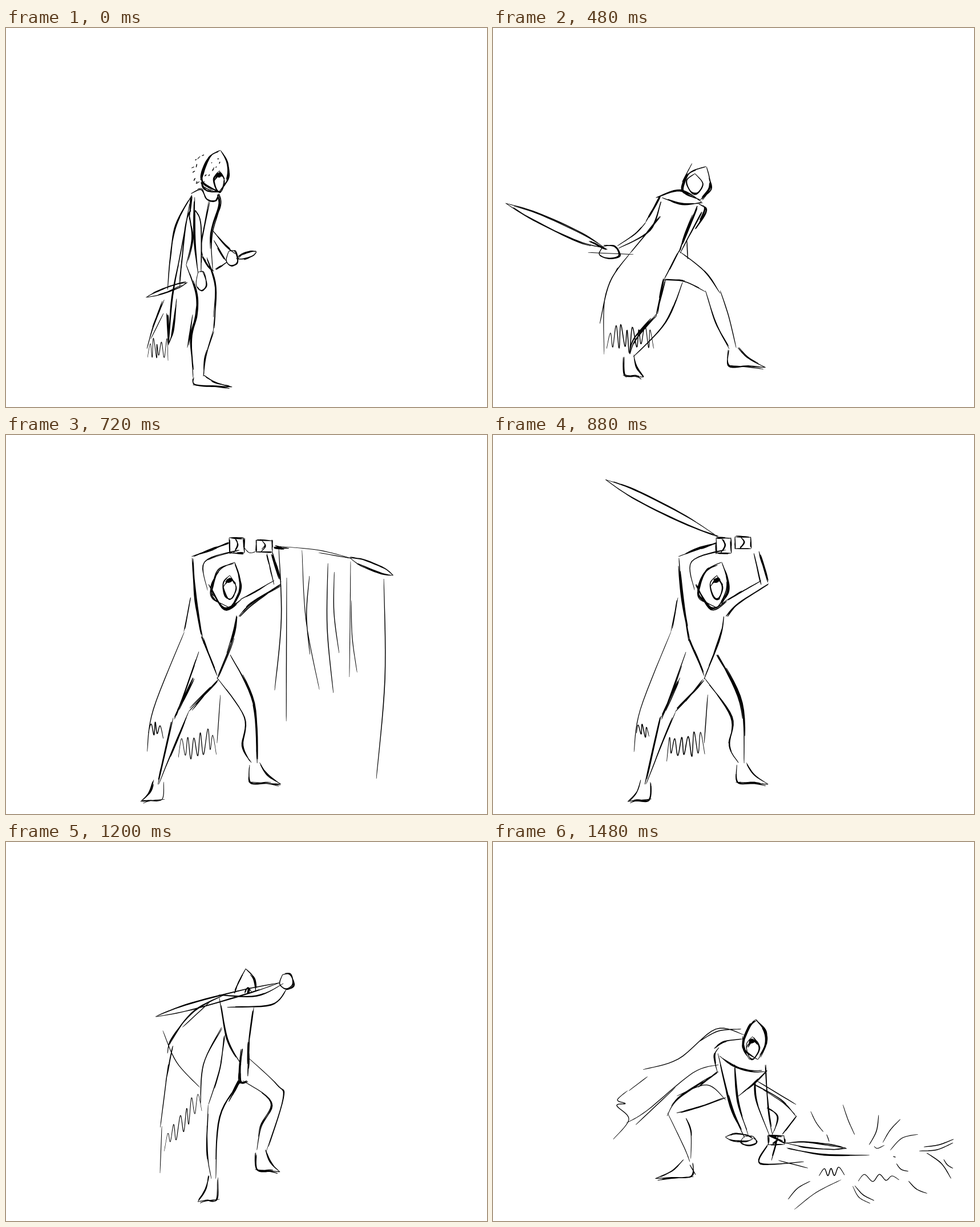
Recreate the animation shown at these times as an HTML page. Size 843 by 664 pixels, loop 1760 ms.

```html
<!DOCTYPE html>
<html lang="en">
<head>
<meta charset="utf-8">
<title>Sword swing</title>
<style>
html, body { margin: 0; width: 100%; height: 100%; overflow: hidden; background: #fff; }
svg { display: block; width: 100%; height: 100%; }
</style>
</head>
<body>
<svg viewBox="0 0 843 664"><path id="ink" fill="#000"/></svg>
<script>
let seed = 1, out = '';

function rnd() {
  seed = (seed * 16807) % 2147483647;
  return seed / 2147483647;
}
const jitter = amp => (rnd() * 2 - 1) * amp;
const mix = (a, b, t) => a + (b - a) * t;

// Catmull-Rom curve through the points, as a dense polyline.
function spline(pts) {
  const last = pts.length - 1, line = [];
  const at = i => pts[Math.max(0, Math.min(last, i))];
  for (let i = 0; i < last; i++) {
    for (let t = 0; t < 1; t += 0.125) {
      line.push([0, 1].map(k => {
        const a = at(i - 1)[k], b = at(i)[k], c = at(i + 1)[k], d = at(i + 2)[k];
        return b + t * (c - a + t * (2 * a - 5 * b + 4 * c - d + t * (3 * (b - c) + d - a))) / 2;
      }));
    }
  }
  line.push(at(last));
  return line;
}

// Outline of a pen line that thins out at both ends.
function taper(line, width) {
  const left = [], right = [], last = line.length - 1;
  line.forEach(([x, y], i) => {
    const a = line[Math.max(0, i - 1)], b = line[Math.min(last, i + 1)];
    const dx = b[0] - a[0], dy = b[1] - a[1], len = Math.hypot(dx, dy) || 1;
    const w = width / 2 * (0.4 + 0.6 * Math.sqrt(Math.abs(Math.sin(Math.PI * i / last))));
    const nx = -dy / len * w, ny = dx / len * w;
    left.push((x + nx).toFixed(1) + ' ' + (y + ny).toFixed(1));
    right.unshift((x - nx).toFixed(1) + ' ' + (y - ny).toFixed(1));
  });
  return 'M' + left.concat(right).join('L') + 'Z';
}

// A pen draws one full line, then goes over random stretches of it.
const pen = (passes, width, wobble) => (...xy) => {
  const pts = [];
  for (let i = 0; i < xy.length; i += 2) pts.push([xy[i], xy[i + 1]]);
  for (let p = 0; p < passes; p++) {
    const amp = p ? wobble : 0.4;
    let line = spline(pts.map(pt => pt.map(v => v + jitter(amp))));
    if (p) {
      const span = Math.ceil(line.length * mix(0.4, 0.8, rnd()));
      const from = Math.floor(rnd() * (line.length - span));
      line = line.slice(from, from + span);
    }
    out += taper(line, width * mix(0.75, 1.15, rnd()));
  }
};
const thin = pen(1, 1.4, 0);
const rough = pen(3, 1.6, 1.8);
const heavy = pen(5, 1.9, 2.4);
const blot = pen(2, 8, 1);

function arc(x1, y1, x2, y2, bow = 5) {
  const len = Math.hypot(x2 - x1, y2 - y1);
  thin(x1, y1, (x1 + x2) / 2 + (y2 - y1) / len * bow, (y1 + y2) / 2 - (x2 - x1) / len * bow, x2, y2);
}

function hood(x, y, rx, ry, lean) {
  const tip = [x + lean, y - ry], chin = [x + rx * 0.25, y + ry];
  heavy(...tip, x - rx * 0.45, y - ry * 0.65, x - rx * 0.9, y + ry * 0.1, x - rx * 0.8, y + ry * 0.6, ...chin);
  heavy(...tip, x + rx * 0.85, y - ry * 0.35, x + rx * 0.9, y + ry * 0.3, ...chin);
}

function face(x, y, rx, ry, dark) {
  rough(x, y - ry, x - rx, y - ry * 0.3, x - rx * 0.6, y + ry * 0.8, x + rx * 0.3, y + ry, x + rx, y, x, y - ry);
  if (dark) {
    blot(x - rx * 0.5, y - ry * 0.5, x + rx * 0.3, y - ry * 0.6);
    heavy(x - rx, y, x, y - ry * 0.7, x + rx, y - ry * 0.2);
  }
}

const fist = (x, y, rx, ry) =>
  rough(x - rx * 0.6, y - ry, x - rx, y + ry * 0.3, x, y + ry, x + rx, y + ry * 0.4, x + rx * 0.5, y - ry, x - rx * 0.6, y - ry);

function box(x, y, w, h) {
  rough(x, y, x + w, y + 1);
  rough(x + w, y, x + w + 1, y + h);
  rough(x + w, y + h, x, y + h);
  rough(x + 1, y + h, x, y);
  rough(x + w * 0.4, y + 2, x + w * 0.6, y + h * 0.5, x + w * 0.3, y + h);
}

function blade(x1, y1, x2, y2, w) {
  const len = Math.hypot(x2 - x1, y2 - y1);
  const nx = (y2 - y1) / len * w / 2, ny = (x1 - x2) / len * w / 2;
  for (const s of [-1, 1]) {
    rough(x1, y1, mix(x1, x2, 0.3) + nx * s, mix(y1, y2, 0.3) + ny * s,
      mix(x1, x2, 0.75) + nx * s, mix(y1, y2, 0.75) + ny * s, x2, y2);
  }
}

function foot(ax, ay, tx, ty) {
  const s = Math.sign(tx - ax);
  rough(ax - s * 8, ay, ax - s * 6, ty - 4, mix(ax, tx, 0.5), ty - 2, tx, ty);
  rough(ax + s * 9, ay - 4, mix(ax, tx, 0.5), mix(ay, ty, 0.5), tx, ty);
  thin(ax - s * 10, ty - 4, mix(ax, tx, 0.5), ty - 1, tx - s * 4, ty + 3);
}

// Ragged edge of n teeth.
function hem(x1, y1, x2, y2, depth, n) {
  const xy = [], steps = n * 2;
  for (let i = 0; i <= steps; i++) {
    const t = i / steps, up = i % 2 ? -1 : 1;
    xy.push(mix(x1, x2, t) + jitter(2), mix(y1, y2, t) + up * depth * mix(0.35, 0.9, rnd()));
  }
  thin(...xy);
}

function specks(x, y, rx, ry, n) {
  while (n--) {
    const px = x + jitter(rx), py = y + jitter(ry);
    thin(px, py, px - 1 - rnd() * 4, py + rnd() * 6);
  }
}

function idle() {
  hood(367, 251, 25, 37, 9);
  face(374, 268, 9, 18, true);
  specks(341, 245, 16, 24, 14);
  specks(368, 240, 10, 12, 6);
  heavy(342, 270, 352, 285, 376, 287);
  rough(324, 290, 342, 283, 352, 300, 367, 302, 372, 292);
  rough(326, 292, 298, 345, 288, 400, 283, 458);
  rough(322, 308, 308, 385, 292, 470, 285, 556);
  rough(324, 320, 314, 350, 304, 456);
  rough(277, 476, 258, 525, 247, 562);
  thin(276, 500, 254, 545);
  rough(299, 474, 292, 530, 285, 554);
  heavy(282, 500, 285, 555);
  hem(248, 563, 284, 562, 24, 5);
  heavy(325, 294, 321, 335);
  rough(322, 330, 326, 370, 316, 415);
  heavy(316, 415, 332, 462, 335, 500, 325, 545, 328, 613);
  rough(331, 297, 330, 370, 337, 430);
  rough(332, 320, 342, 345, 342, 428);
  fist(342, 444, 9, 16);
  rough(357, 304, 343, 375, 345, 400);
  heavy(345, 400, 354, 416, 364, 426);
  heavy(372, 290, 374, 312, 360, 360, 362, 424);
  rough(361, 353, 384, 380, 402, 396);
  rough(364, 372, 386, 408);
  fist(396, 404, 10, 13);
  blade(404, 404, 439, 392, 9);
  rough(368, 424, 388, 410);
  blade(245, 472, 318, 446, 7);
  heavy(352, 402, 368, 455, 363, 530);
  rough(363, 530, 350, 575, 346, 610);
  rough(318, 560, 327, 502);
  foot(337, 612, 396, 629);
}

function turnBack() {
  hood(372, 266, 29, 27, 24);
  face(371, 267, 16, 20);
  rough(344, 272, 352, 252, 376, 240, 400, 244);
  heavy(314, 284, 345, 277);
  rough(345, 276, 368, 278, 390, 322, 389, 340);
  rough(322, 286, 350, 308, 380, 308);
  rough(340, 314, 378, 315);
  heavy(317, 286, 304, 325, 290, 352);
  rough(290, 352, 269, 390);
  rough(304, 325, 288, 398);
  fist(272, 404, 14, 18);
  blade(196, 426, 258, 411, 8);
  thin(218, 430, 240, 416);
  rough(290, 390, 284, 460, 268, 503);
  thin(268, 503, 248, 570, 254, 615);
  thin(254, 602, 262, 560, 280, 532);
  hem(268, 575, 309, 580, 26, 4);
  rough(378, 322, 350, 375, 334, 460, 306, 590);
  heavy(385, 313, 371, 355);
  heavy(361, 350, 358, 420, 366, 460);
  rough(365, 360, 368, 440, 374, 475);
  heavy(374, 470, 378, 498, 352, 570);
  thin(352, 565, 347, 606);
  rough(336, 455, 343, 522, 326, 578);
  rough(328, 530, 333, 572, 326, 620);
  foot(338, 612, 386, 629);
}

function lungeBody() {
  hood(357, 272, 26, 29, 17);
  face(354, 272, 14, 17);
  thin(349, 237, 331, 270);
  rough(285, 297, 328, 284, 366, 305);
  rough(296, 297, 330, 308, 368, 306);
  heavy(293, 295, 268, 340);
  rough(268, 340, 250, 360, 218, 382);
  rough(294, 305, 275, 355, 220, 386);
  fist(204, 393, 18, 11);
  rough(294, 330, 240, 395);
  thin(240, 395, 205, 445, 187, 518);
  thin(218, 420, 196, 475, 195, 572);
  hem(200, 548, 282, 540, 30, 8);
  heavy(358, 312, 338, 360, 326, 392);
  rough(326, 390, 300, 440);
  heavy(360, 308, 373, 320, 354, 353);
  rough(366, 322, 328, 395);
}

function step() {
  lungeBody();
  blade(86, 402, 196, 390, 12);
  rough(328, 392, 375, 440, 392, 490, 396, 560);
  rough(302, 440, 350, 458, 384, 562);
  foot(390, 564, 440, 597);
  heavy(300, 440, 290, 510, 266, 578);
  rough(332, 445, 315, 520, 274, 580);
  foot(268, 582, 300, 616);
}

function lunge() {
  lungeBody();
  blade(22, 307, 196, 386, 15);
  heavy(168, 373, 200, 388);
  thin(167, 393, 246, 397);
  rough(328, 392, 370, 425, 398, 465);
  thin(398, 460, 413, 505, 426, 560);
  rough(300, 440, 335, 444, 372, 462);
  rough(372, 460, 390, 515, 414, 562);
  foot(420, 564, 478, 595);
  heavy(300, 440, 286, 505);
  heavy(286, 502, 250, 545, 240, 572);
  rough(332, 445, 303, 515, 246, 576);
  foot(238, 576, 264, 612);
  thin(340, 372, 341, 405);
}

function stance() {
  hood(386, 263, 27, 40, 15);
  face(392, 266, 11, 20, true);
  heavy(355, 262, 382, 304, 412, 288);
  rough(412, 288, 440, 272, 470, 255);
  heavy(326, 215, 332, 290, 346, 365);
  heavy(344, 355, 370, 422);
  heavy(405, 318, 398, 355, 370, 428);
  heavy(370, 430, 320, 485);
  rough(320, 485, 295, 545, 268, 612);
  rough(338, 380, 312, 455, 295, 498);
  heavy(328, 425, 295, 495);
  heavy(293, 495, 266, 612);
  rough(370, 425, 418, 495, 414, 545, 430, 574);
  heavy(393, 385, 435, 470, 440, 575);
  foot(435, 578, 482, 612);
  foot(268, 608, 236, 642);
  rough(324, 285, 312, 345);
  thin(312, 345, 258, 480, 247, 555);
  hem(250, 515, 275, 518, 16, 3);
  hem(303, 550, 370, 535, 28, 6);
  thin(376, 455, 370, 540);
}

function armsUp() {
  heavy(390, 190, 360, 200, 325, 213);
  rough(408, 201, 348, 222, 353, 272);
  box(391, 180, 26, 27);
  rough(470, 262, 457, 207);
  heavy(466, 204, 482, 258);
  heavy(482, 262, 430, 295, 408, 318);
}

function rise() {
  stance();
  rough(328, 220, 345, 310, 440, 380);
  rough(400, 320, 452, 378);
  box(440, 374, 24, 22);
  blade(462, 386, 612, 544, 13);
  arc(340, 570, 590, 560, -40);
}

function upSwing() {
  stance();
  armsUp();
  box(438, 184, 28, 21);
  thin(416, 195, 426, 206, 438, 204);
  heavy(470, 196, 496, 199);
  thin(480, 195, 548, 202, 602, 215);
  thin(548, 206, 604, 216);
  blade(602, 215, 679, 246, 12);
  arc(478, 196, 471, 447, 8);
  arc(492, 250, 491, 502, 0);
  arc(519, 202, 549, 446, -8);
  arc(532, 247, 533, 384, -6);
  arc(564, 225, 574, 452, -6);
  arc(575, 240, 584, 382, -5);
  arc(604, 222, 602, 424, 0);
  arc(605, 290, 615, 416, -3);
  arc(662, 252, 649, 602, 9);
}

function overhead() {
  stance();
  armsUp();
  box(434, 180, 28, 21);
  blade(450, 182, 535, 76, 12);
  arc(560, 100, 650, 215, 10);
  arc(530, 130, 590, 215, 8);
}

function windUp() {
  stance();
  armsUp();
  box(424, 178, 28, 21);
  blade(394, 178, 197, 78, 13);
}

function spinBody() {
  rough(358, 265, 357, 310, 368, 350);
  heavy(368, 350, 380, 380, 393, 402);
  rough(422, 298, 406, 368);
  heavy(408, 350, 393, 402, 392, 424);
  hood(403, 255, 19, 31, 3);
  face(402, 260, 11, 19, true);
  blot(394, 246, 409, 247);
  rough(385, 278, 430, 280, 477, 287);
  rough(422, 297, 472, 287);
  heavy(368, 350, 348, 435);
  rough(347, 435, 332, 585);
  rough(390, 420, 366, 490, 348, 550);
  rough(376, 450, 348, 540);
  foot(338, 582, 318, 614);
  rough(405, 375, 436, 440, 442, 470, 430, 555);
  rough(390, 420, 420, 458, 416, 550);
  foot(424, 560, 454, 602);
}

function spinArms() {
  rough(440, 186, 378, 215, 358, 280);
  rough(430, 195, 385, 232, 380, 284);
  rough(447, 195, 448, 275);
  heavy(457, 198, 465, 282);
  fist(435, 189, 6, 7);
}

function spin() {
  spinBody();
  spinArms();
  blade(409, 167, 436, 184, 10);
  blade(440, 190, 553, 331, 7);
  thin(526, 302, 547, 346);
  thin(374, 430, 390, 475, 401, 502);
  arc(440, 300, 465, 347, 2);
  thin(450, 310, 511, 405, 546, 486);
  thin(511, 425, 535, 475, 550, 556);
  hem(432, 540, 555, 544, 24, 8);
}

function spinLow() {
  spinBody();
  spinArms();
  blade(434, 190, 300, 395, 9);
  arc(520, 420, 345, 440, -30);
  hem(436, 535, 500, 540, 20, 5);
}

function swingBody() {
  rough(374, 272, 388, 345, 412, 390);
  rough(434, 290, 424, 362);
  heavy(426, 350, 424, 410);
  heavy(414, 362, 410, 418, 424, 420);
  rough(400, 265, 408, 245, 420, 222);
  rough(420, 222, 434, 238, 438, 262);
  blot(423, 261, 427, 262);
  rough(418, 265, 424, 255, 431, 264);
  rough(382, 340, 375, 395, 355, 460);
  rough(354, 460, 352, 540, 360, 590);
  rough(412, 418, 375, 480, 368, 590);
  heavy(410, 418, 390, 455);
  foot(364, 588, 336, 630);
  rough(425, 378, 475, 425, 485, 450, 456, 542);
  rough(415, 418, 465, 455, 447, 500, 440, 540);
  foot(446, 544, 480, 578);
  rough(388, 265, 330, 295, 290, 345, 283, 370);
  thin(358, 280, 309, 325);
  rough(292, 358, 280, 420);
  thin(284, 390, 270, 500);
  rough(378, 325, 346, 390, 341, 460);
  thin(270, 580, 273, 498);
  hem(278, 528, 342, 450, 28, 6);
}

function spinBehind() {
  swingBody();
  rough(372, 268, 440, 270, 486, 248);
  rough(388, 290, 465, 285, 492, 258);
  fist(492, 245, 12, 13);
  blade(480, 246, 262, 306, 10);
  arc(275, 330, 340, 430, -10);
}

function drawOver() {
  swingBody();
  fist(500, 219, 14, 12);
  heavy(496, 225, 517, 236);
  blade(410, 207, 490, 219, 9);
  heavy(412, 208, 450, 206, 488, 218);
  arc(411, 204, 307, 252, -12);
  arc(410, 211, 328, 248);
  arc(412, 217, 340, 250);
  arc(420, 226, 345, 257);
  arc(402, 240, 330, 276);
  rough(372, 268, 455, 263, 495, 215);
  rough(388, 290, 430, 284);
  rough(460, 278, 498, 225);
  rough(434, 300, 460, 312, 486, 320);
  rough(486, 320, 494, 245);
  heavy(486, 262, 488, 290);
  thin(436, 283, 465, 298, 488, 296);
  thin(728, 653, 730, 653);
}

function strike() {
  swingBody();
  rough(388, 282, 470, 290, 536, 284);
  rough(434, 308, 490, 318, 536, 302);
  fist(544, 292, 12, 13);
  blade(554, 288, 735, 224, 12);
  arc(440, 190, 720, 210, 40);
  arc(500, 215, 640, 210, 15);
}

function impact() {
  hood(459, 346, 21, 35, 2);
  face(455, 360, 11, 19, true);
  rough(437, 340, 440, 362, 450, 382);
  heavy(397, 375, 420, 392, 450, 402, 478, 402);
  rough(388, 362, 405, 350, 437, 345);
  rough(396, 360, 388, 375, 393, 402);
  heavy(394, 370, 418, 465, 441, 518);
  rough(424, 390, 430, 455, 448, 515);
  rough(478, 390, 482, 470, 490, 515);
  rough(458, 420, 462, 455, 485, 515);
  blade(407, 517, 455, 520, 12);
  fist(448, 524, 14, 8);
  box(482, 514, 28, 16);
  heavy(484, 515, 514, 528);
  blade(512, 527, 620, 537, 8);
  rough(516, 537, 580, 547, 660, 549);
  thin(440, 338, 390, 328, 325, 380, 263, 399);
  thin(360, 350, 395, 331, 435, 328);
  thin(271, 411, 238, 436);
  thin(236, 436, 218, 452, 232, 458, 217, 462, 238, 486, 211, 521);
  thin(395, 390, 350, 405, 270, 470, 234, 492);
  thin(250, 495, 320, 430);
  rough(392, 405, 325, 450, 305, 480);
  rough(394, 402, 360, 430);
  rough(408, 448, 360, 465, 322, 475);
  thin(322, 445, 375, 426, 408, 452);
  thin(306, 475, 335, 535, 345, 560);
  rough(338, 484, 347, 510, 347, 555);
  foot(342, 562, 284, 590);
  thin(345, 565, 355, 583);
  thin(462, 418, 531, 460);
  rough(460, 425, 505, 452, 531, 480);
  rough(532, 480, 507, 512);
  rough(480, 465, 500, 482, 490, 512);
  rough(500, 515, 488, 558);
  rough(482, 530, 468, 563, 545, 560);
  thin(500, 558, 552, 571);
  rough(480, 400, 455, 425, 430, 445);

  arc(557, 472, 579, 508, -2);
  arc(585, 512, 589, 525, 0);
  arc(613, 460, 634, 513, -1);
  arc(676, 478, 659, 531);
  arc(714, 486, 683, 527, -3);
  arc(745, 512, 696, 540, -8);
  arc(807, 521, 755, 534, 3);
  arc(806, 527, 747, 541, 5);
  arc(760, 545, 803, 590, 6);
  arc(790, 556, 806, 572, -2);
  arc(728, 594, 761, 616, -4);
  arc(630, 603, 661, 633, -6);
  arc(634, 602, 668, 628, -4);
  arc(610, 592, 528, 644, -5);
  arc(556, 594, 517, 626, -4);
  arc(707, 563, 728, 577, -4);
  thin(668, 533, 674, 537, 686, 531);
  thin(701, 551, 706, 552);
  hem(573, 581, 614, 577, 11, 3);
  hem(640, 588, 712, 588, 8, 3);
}

const LOOP = 1760;
const poses = [
  [0, idle], [280, turnBack], [360, step], [480, lunge], [640, rise], [720, upSwing],
  [800, overhead], [880, windUp], [1040, spin], [1120, spinLow], [1200, spinBehind],
  [1320, drawOver], [1400, strike], [1480, impact]
].map(([start, sketch], i) => {
  seed = 977 * (i + 1);
  out = '';
  sketch();
  return { start, d: out };
});

const ink = document.getElementById('ink');
let shown;

function draw(now) {
  const t = now % LOOP;
  const pose = poses.findLast(p => p.start <= t);
  if (pose !== shown) ink.setAttribute('d', pose.d);
  shown = pose;
}

function tick() {
  draw(performance.now());
  requestAnimationFrame(tick);
}
tick();
</script>
</body>
</html>
```
